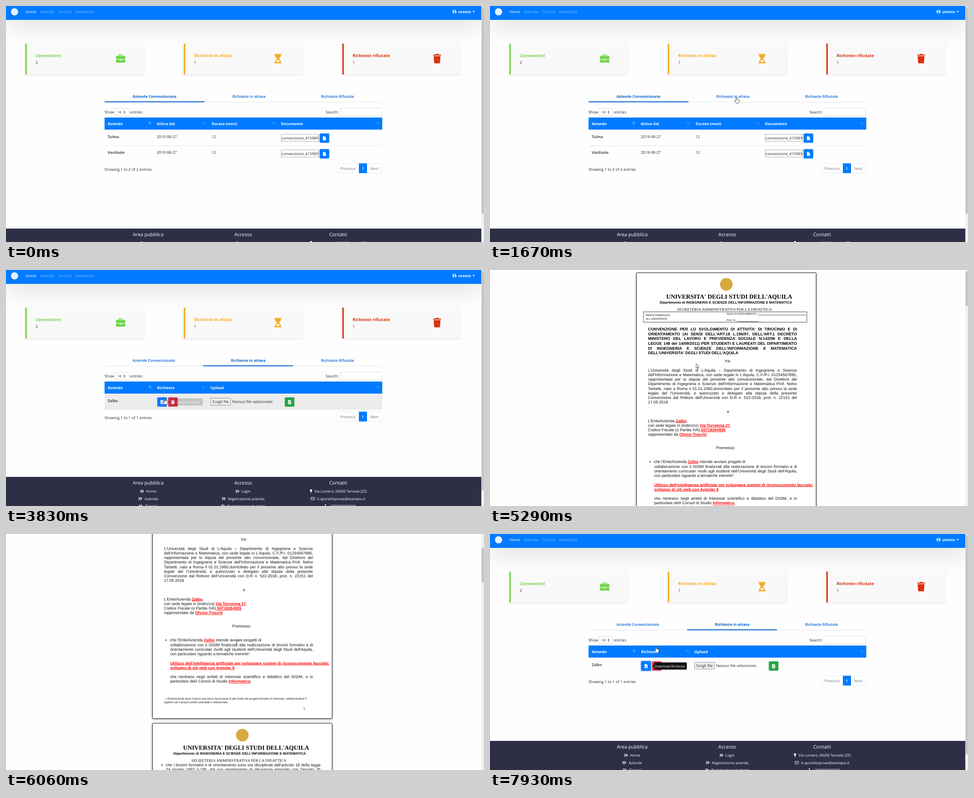
These frames come from a looping animation (1062 px wide and 527 px high, 8 s). An HTML page:

```html
<!DOCTYPE html>
<html lang="it">
<head>
<meta charset="utf-8">
<title>Convenzioni</title>
<style>
html, body { margin: 0; width: 100%; height: 100%; overflow: hidden; background: #fefefe; }
svg { display: block; width: 100vw; height: 100vh; }
text { font: 8.5px "Open Sans", "Noto Sans", sans-serif; fill: #212529; text-rendering: geometricPrecision; white-space: pre; }
.b { font-weight: 700; font-size: 8.4px; }
.s { font-weight: 600; font-size: 8.4px; }
.m { text-anchor: middle; }
.w { fill: #fff; }
.dim { fill: #fff; fill-opacity: .5; }
.link { fill: #0062cc; }
.title { font-weight: 700; font-size: 9.2px; }
.head { font-weight: 500; font-size: 10.7px; fill: #fff; }
.foot { font-size: 8px; fill: #fff; }
.tip { font-size: 7.3px; fill: #fff; }
.gray { fill: #6c757d; }
.doc text { font: 8.87px "Liberation Sans", Arial, sans-serif; fill: #111; }
.doc .bold { font-weight: 700; fill: #000; }
.doc .uni { font: 700 13.65px "Liberation Serif", serif; fill: #000; }
.doc .dept { font-weight: 700; font-size: 7.73px; fill: #000; }
.doc .office { font: 8.8px "Liberation Serif", serif; }
.doc .small { font-size: 6px; }
.doc .note { font-size: 6.1px; }
.red { font-weight: 700; fill: #f00; text-decoration: underline; }
.nav { filter: drop-shadow(0 9px 27px rgba(0,0,0,.175)); }
.card { filter: drop-shadow(0 1px 2px rgba(0,0,0,.12)); }
.page { filter: drop-shadow(0 1px 2px rgba(0,0,0,.55)); }

.home { animation: home 8s step-end infinite; }
.doc { animation: doc 8s step-end infinite; }
.tabA { animation: tabA 8s step-end infinite; }
.tabB { animation: tabB 8s step-end infinite; }
.paneA { animation: paneA 8s linear infinite; }
.paneB { animation: paneB 8s linear infinite; }
.longer { animation: before 8s step-end infinite; }
.shorter { animation: after 8s step-end infinite; }
.footer { animation: footer 8s step-end infinite; }
.row1 { animation: row1 8s step-end infinite; }
.row2 { animation: row2 8s step-end infinite; }
.row3 { animation: row3 8s step-end infinite; }
.tooltip { animation: tooltip 8s linear infinite; }
.focus { animation: focus 8s step-end infinite; }
.status { animation: status 8s step-end infinite; }
.scroll { animation: scroll 8s linear infinite; }
.thumb { animation: thumb 8s linear infinite; }
.cursor { animation: move 8s linear infinite; }
.arrow { animation: arrow 8s step-end infinite; }
.hand { animation: hand 8s step-end infinite; }
.beam { animation: beam 8s step-end infinite; }

@keyframes home { 0% { opacity: 1 } 55.6% { opacity: 0 } 89.4%, 100% { opacity: 1 } }
@keyframes doc { 0% { opacity: 0 } 57.5% { opacity: 1 } 89.4%, 100% { opacity: 0 } }
@keyframes tabA { 0% { opacity: 1 } 29.6%, 100% { opacity: 0 } }
@keyframes tabB { 0% { opacity: 0 } 29.6%, 100% { opacity: 1 } }
@keyframes paneA { 0%, 29.6% { opacity: 1 } 31.6%, 100% { opacity: 0 } }
@keyframes paneB { 0%, 31.6% { opacity: 0 } 33.5%, 100% { opacity: 1 } }
@keyframes before { 0% { opacity: 1 } 31.6%, 100% { opacity: 0 } }
@keyframes after { 0% { opacity: 0 } 31.6%, 100% { opacity: 1 } }
@keyframes footer { 0% { transform: none } 31.6%, 100% { transform: translateY(-35px) } }
@keyframes row1 { 0% { opacity: 0 } 12.3% { opacity: 1 } 14.5%, 100% { opacity: 0 } }
@keyframes row2 { 0% { opacity: 0 } 10.5% { opacity: 1 } 12.3%, 100% { opacity: 0 } }
@keyframes row3 { 0% { opacity: 0 } 45.8% { opacity: 1 } 60%, 100% { opacity: 0 } }
@keyframes tooltip { 0%, 47.2% { opacity: 0 } 47.9% { opacity: .18 } 49.9%, 100% { opacity: 1 } }
@keyframes focus { 0% { opacity: 0 } 55%, 100% { opacity: 1 } }
@keyframes status {
  0% { opacity: 0 } 24.75% { opacity: .5 } 25.6% { opacity: 1 } 41.2% { opacity: 0 }
  51.75% { opacity: .5 } 52.7% { opacity: 1 } 55.6%, 100% { opacity: 0 }
}
@keyframes scroll {
  0%, 68% { transform: none } 72.87% { transform: translateY(-106.6px) }
  80.6%, 100% { transform: translateY(-333px) }
}
@keyframes thumb {
  0%, 68% { transform: none } 72.87% { transform: translateY(15.5px) }
  80.6%, 100% { transform: translateY(48px) }
}
@keyframes move {
  0%, 1.6% { transform: translate(1000px, 560px) }
  1.62% { transform: translate(982px, 518px) }
  6.25% { transform: translate(845px, 440px) }
  11.25% { transform: translate(650px, 332px) }
  15% { transform: translate(585px, 268px) }
  18.1% { transform: translate(552px, 222px) }
  20.8% { transform: translate(547.5px, 204px) }
  22.6% { transform: translate(547.5px, 204px) }
  22.9%, 27.6% { transform: translate(548px, 201px) }
  27.75%, 35.2% { transform: translate(545px, 195px) }
  35.4%, 39.2% { transform: translate(547px, 201px) }
  43.1% { transform: translate(470px, 250px) }
  47.8% { transform: translate(353px, 287px) }
  49.9%, 61.3% { transform: translate(347px, 290px) }
  66%, 67% { transform: translate(458px, 209.5px) }
  71.5%, 78.1% { transform: translate(512.5px, 236.5px) }
  81.5% { transform: translate(380px, 107px) }
  84.4% { transform: translate(228px, 8px) }
  85.4%, 93.3% { transform: translate(215px, -30px) }
  93.4% { transform: translate(228px, 16px) }
  96% { transform: translate(290px, 130px) }
  99%, 100% { transform: translate(369px, 252px) }
}
@keyframes arrow {
  0% { opacity: 1 } 14.5% { opacity: 0 } 16% { opacity: 1 } 18.6% { opacity: 0 }
  40.4% { opacity: 1 } 43.1% { opacity: 0 } 45.8% { opacity: 1 } 47% { opacity: 0 }
  57.5% { opacity: 1 } 69.5% { opacity: 0 } 79.6% { opacity: 1 } 98.7%, 100% { opacity: 0 }
}
@keyframes hand {
  0% { opacity: 0 } 14.5% { opacity: 1 } 16% { opacity: 0 } 18.6% { opacity: 1 }
  40.4% { opacity: 0 } 43.1% { opacity: 1 } 45.8% { opacity: 0 } 47% { opacity: 1 }
  57.5% { opacity: 0 } 98.7%, 100% { opacity: 1 }
}
@keyframes beam { 0% { opacity: 0 } 69.5% { opacity: 1 } 79.6%, 100% { opacity: 0 } }
</style>
</head>
<body>
<svg id="stage" viewBox="0 0 1062 527"></svg>
<script>
const text = (x, y, s, c = '', more = '') => `<text x="${x}" y="${y}" class="${c}" ${more}>${s}</text>`;
const rect = (x, y, w, h, fill, more = '') => `<rect x="${x}" y="${y}" width="${w}" height="${h}" fill="${fill}" ${more}/>`;
const path = (d, fill, more = '') => `<path d="${d}" fill="${fill}" ${more}/>`;
const group = (c, ...kids) => `<g class="${c}">${kids.join('')}</g>`;
const at = (x, y, s) => `<g transform="translate(${x} ${y})">${s}</g>`;
const box = (x, y, w, h, stroke, fill = '#fff', rx = 2) => rect(x, y, w, h, fill, `stroke="${stroke}" stroke-width=".8" rx="${rx}"`);
const red = s => `<tspan class="red">${s}</tspan>`;
const track = rect(1056, 0, 6, 527, '#f1f1f1');
const blue = '#007bff', line = '#dee2e6';

// Dashboard cards
const card = (x, color, name, n, icon) =>
  rect(x, 84, 262.5, 69, '#f9f9f9', 'class="card"') + rect(x, 84, 3.2, 69, color) +
  text(x + 23, 114.4, name, 'title', `style="fill:${color}"`) + text(x + 23, 129, n) + icon;

const briefcase = rect(244.3, 111.5, 20.8, 15, '#72d54a', 'rx="1.8"') +
  path('M250.6 112V110.2q0-1 1-1h6.2q1 0 1 1V112', 'none', 'stroke="#72d54a" stroke-width="1.8"') +
  rect(244, 118.8, 21.4, 1.1, '#f9f9f9') + rect(252.4, 118.8, 4.6, 2.4, '#f9f9f9');
const hourglass = path('M596.8 107.2h15v2.7h-15zM596.8 125.2h15v2.7h-15zM598.2 109h12.2q0 6-4.2 8.5 4.2 2.600 4.200 8.500h-12.200q0-6 4.200-8.500-4.200-2.500-4.200-8.500z', '#fca91b') +
  path('M600.600 125.200q.7-5 3.700-5.700 3 .7 3.700 5.700z', '#f9f9f9');
const trash = path('M949 108.400h5l1-1.300h5.600l1 1.300h4.800v2.400h-17.400zM950.200 112h15l-1 14.500q-.1 1.500-1.600 1.500h-9.800q-1.500 0-1.600-1.500z', '#d9320f');

// Tables
const sort = (x, up = .35) => at(x, 261.5,
  path('M0 3V-3M-1.300-1.600L0-3 1.300-1.600', 'none', `stroke="#fff" stroke-width=".8" opacity="${up}"`) +
  path('M3.700-3V3M2.400 1.600L3.700 3 5 1.600', 'none', 'stroke="#fff" stroke-width=".8" opacity=".35"'));
const header = (cols, sorts) => rect(219, 249, 617, 27, blue) +
  cols.map(([x, s]) => text(x, 266, s, 'b w')).join('') +
  sorts.map((x, i) => sort(x, i ? .35 : 1)).join('');
const sheet = path('M-3.200-4.500H1L3.400-2V4.500H-3.200z', '#fff');
const button = (x, y, color, icon) => rect(x, y, 21.500, 21, color, 'rx="2.200"') + at(x + 10.700, y + 10.700, icon);
const fileIcon = (color, d) => sheet + path(d, 'none', `stroke="${color}" stroke-width="1"`);
const down = 'M0-1.500V2.500M-1.500 1L0 2.500 1.500 1', upArrow = 'M0 3V-1M-1.500 .5L0-1 1.500 .5';

const company = (y, name) => text(226, y + 18, name, 's') + text(335, y + 18, '2019-08-27') + text(457, y + 18, '12') +
  box(611.400, y + 9.800, 83, 16, '#999', '#fff', 0) +
  text(612.300, y + 21, 'convenzione_415989', '', 'style="font-size:8.4px"') +
  button(696.700, y + 8, blue, sheet + path('M1-4.500V-2H3.400', 'none', `stroke="${blue}" stroke-width=".6"`));
const pager = (y, n) => text(219, y + 16, `Showing 1 to ${n} of ${n} entries`) +
  box(736.400, y, 99, 21, line) + rect(784, y - .4, 18, 21.800, blue) +
  text(760, y + 14, 'Previous', 'm gray') + text(793, y + 14, '1', 's m w') + text(818.500, y + 14, 'Next', 'm gray');

const paneA = group('paneA',
  header([[226, 'Azienda'], [335, 'Attiva dal'], [457, 'Durata (mesi)'], [611, 'Documento']], [318.500, 439.500, 593.500, 824.500]),
  group('row1', rect(219, 276, 617, 36, '#ececec')), group('row2', rect(219, 312, 617, 35, '#ececec')),
  company(276.500, 'Tulma'), rect(219, 311.800, 617, .8, line), company(311.500, 'Vardisole'), pager(351.800, 2));

const paneB = group('paneB',
  header([[226, 'Azienda'], [336, 'Richiesta'], [454, 'Upload']], [319.500, 436.500, 824.500]),
  group('row3', rect(219, 276, 617, 36, '#ececec')),
  text(226, 294.500, 'Zalbo', 's'),
  group('focus', rect(334.500, 282.500, 24.500, 24, blue, 'rx="3.500" opacity=".5"')),
  button(336, 284.300, blue, fileIcon(blue, down)),
  button(360, 284.300, '#dc3545', path('M-4-4h2.500l.5-.7h2l.5.700H4v1.200H-4zM-3.400-2.200H3.400L3 4.500H-3z', '#fff')),
  box(454.400, 286.200, 44.600, 15.600, '#767676', '#efefef', 1), text(458.300, 297, 'Scegli file'),
  text(502.500, 297, 'Nessun file selezionato', '', 'style="font-size:8.4px"'),
  button(619.300, 284.300, '#28a745', fileIcon('#28a745', upArrow)),
  group('tooltip', path('M360.300 295L364.600 291.500V298.500z', '#111'), rect(364.500, 286.800, 72.800, 16, '#111', 'rx="2"'),
    text(365.800, 297.500, 'Download Richiesta', 'tip')),
  pager(316.800, 1));

const tabs = rect(219, 214, 617, .8, line) +
  group('tabA', text(330, 205.300, 'Aziende Convenzionate', 'b m link'), text(539.800, 205.300, 'Richieste in attesa', 's m link'),
    rect(219, 213, 222, 2, '#0062cc')) +
  group('tabB', text(328.500, 205.300, 'Aziende Convenzionate', 's m link'), text(538.300, 205.300, 'Richieste in attesa', 'b m link'),
    rect(438, 213, 199.500, 2, '#0062cc')) +
  text(736.700, 205.300, 'Richieste Rifiutate', 's m link');

const controls = text(219, 239.600, 'Show') + box(243, 228.400, 29, 16.600, '#ced4da') + text(248, 240, '10', '', 'style="font-size:7.6px"') +
  path('M261.200 236.300l2-2.600 2 2.600zM261.200 237.700l2 2.600 2-2.600z', '#343a40') + text(275.500, 239.600, 'entries') +
  text(710, 239.800, 'Search:') + box(742.400, 228.400, 93, 16.600, '#ced4da');

// Footer
const chevrons = (x, y) => path(`M${x} ${y - 6}l3 3-3 3M${x + 4} ${y - 6}l3 3-3 3`, 'none', 'stroke="#fff" stroke-width="1.500"');
const item = (ix, x, y, s) => chevrons(ix, y) + text(x, y, s, 'foot');
const footer = group('footer', rect(0, 497, 1056, 80, '#2d3044'),
  text(316, 513.700, 'Area pubblica', 'head m'), text(527, 513.700, 'Accesso', 'head m'), text(738, 513.700, 'Contatti', 'head m'),
  item(298.500, 311, 532, 'Home'), item(294.500, 308, 548.500, 'Aziende'), item(295.500, 309.500, 565, 'Tirocini'),
  item(510.500, 523, 532, 'Login'), item(480, 493, 548.500, 'Registrazione azienda'), item(478.500, 491.500, 565, 'Registrazione studente'),
  '<circle cx="677.700" cy="527.200" r="2.500" fill="#fff"/>', rect(677.200, 529, 1.100, 4.500, '#fff'),
  text(685.500, 532, 'Via Lumero, 00000 Tarviola (ZZ)', 'foot'),
  box(677.600, 542.500, 8, 6, '#fff', 'none', .8), path('M677.600 543.500l4 3 4-3', 'none', 'stroke="#fff" stroke-width=".9"'),
  text(691, 548.500, 'it.sportelloprove@esempio.it', 'foot'),
  path('M708.500 558.500l1.500-.8 1 2-1 1q.8 2 2.400 2.600l1-1 1.500 1.200-1 1.600q-5 0-5.400-6.600z', '#fff'),
  text(717.500, 565, '+390000000000', 'foot'));

const nav = rect(0, 0, 1056, 31, blue, 'class="nav"') + '<circle cx="19" cy="13" r="8" fill="#e6f2ff"/>' +
  text(43, 16.200, 'Home', 'w') + text(76, 16.200, 'Aziende', 'dim') + text(116, 16.200, 'Tirocini', 'dim') + text(153.500, 16.200, 'Statistiche', 'dim') +
  '<circle cx="996.500" cy="13" r="4.300" fill="#fff"/><circle cx="996.500" cy="11.700" r="1.600" fill="#007bff"/>' +
  path('M993.600 15.500q.4-1.600 1.700-1.600h2.400q1.300 0 1.700 1.600-2.900 2.200-5.800 0z', blue) +
  text(1005, 16.300, 'utente', 'b w') + path('M1036.300 11.500h5.600l-2.800 3z', '#fff');

const home = group('home', nav,
  card(43, '#72d54a', 'Convenzioni', 2, briefcase),
  card(395, '#fca91b', 'Richieste in attesa', 1, hourglass),
  card(747.300, '#d9320f', 'Richieste rifiutate', 1, trash),
  tabs, controls, paneA, paneB, footer, track,
  group('longer', rect(1056.700, 2, 4.800, 462, '#c1c1c1')),
  group('shorter', rect(1056.700, 2, 4.800, 490, '#c1c1c1')));

// Agreement pages; every line but the last is justified to width w
const para = (x, w, y, step, rows, c = '') => rows.map((s, i) =>
  text(x, y + i * step, s, c, i < rows.length - 1 ? `data-w="${w}"` : '')).join('');
const bullet = (x, y) => `<circle cx="${x}" cy="${y - 3}" r="1.200" fill="#111"/>`;
const letterhead = (y, a, b, c) => `<circle cx="525" cy="${y + 26}" r="14" fill="#d9a93f"/>` +
  text(a, y + 58.400, "UNIVERSITA' DEGLI STUDI DELL'AQUILA", 'uni m') +
  text(b, y + 69.400, "Dipartimento di INGEGNERIA E SCIENZE DELL'INFORMAZIONE E MATEMATICA", 'dept m') +
  text(c, y + 85.200, 'SEGRETERIA AMMINISTRATIVA PER LA DIDATTICA', 'office m');
const page = y => rect(325.500, y, 399, 597, '#fff', 'class="page" stroke="#222" rx="1.500"');

const page1 = page(6.200) + letterhead(6, 531.500, 524, 521) +
  rect(341, 93.500, 363, 23, 'none', 'stroke="#333" stroke-width=".9"') +
  text(346, 103, 'PARTE RISERVATA', 'small') + text(346, 110.500, "ALL'UNIVERSITA'", 'small') +
  text(526, 100.200, 'DATA DI RICEVIMENTO:', 'small') + rect(596, 100.300, 106, .8, '#222') +
  text(526, 114.200, 'Prot. N.', 'small') + rect(548.500, 114.600, 47.500, .8, '#222') +
  para(351, 331, 135.300, 10.580, [
    "CONVENZIONE PER LO SVOLGIMENTO DI ATTIVITA' DI TIROCINIO E DI",
    "ORIENTAMENTO (AI SENSI DELL'ART.18 L.196/97, DELL'ART.1 DECRETO",
    'MINISTERO DEL LAVORO E PREVIDENZA SOCIALE N.142/98 E DELLA',
    'LEGGE 148 del 14/09/2011) PER STUDENTI E LAUREATI DEL DIPARTIMENTO',
    "DI INGEGNERIA E SCIENZE DELL'INFORMAZIONE E MATEMATICA",
    "DELL'UNIVERSITA' DEGLI STUDI DELL'AQUILA"], 'bold') +
  text(529, 206.300, 'tra:', 'm') +
  para(351, 331, 227, 10.150, [
    "L'Universitá degli Studi di L'Aquila – Dipartimento di Ingegneria e Scienze",
    "dell'Informazione e Matematica, con sede legale in L'Aquila, C.F./P.I. 01234567890,",
    'rappresentata per la stipula del presente atto convenzionale, dal Direttore del',
    "Dipartimento di Ingegneria e Scienze dell'Informazione e Matematica Prof. Nelvo",
    'Tarbetti, nato a Roma il 01.01.1960,domiciliato per il presente atto presso la sede',
    "legale del l'Universitá, e autorizzato e delegato alla stipula della presente",
    "Convenzione dal Rettore dell'Universitá con D.R n. 522-2018, prot. n. 22151 del",
    '17.05.2018']) +
  text(529, 318.500, 'e', 'm') +
  text(351, 339.500, `L'Ente/Azienda ${red('Zalbo')},`) +
  text(351, 349.700, `con sede legale in (indirizzo) ${red('Via Torvenna 27')},`) +
  text(351, 359.900, `Codice Fiscale (o Partita IVA)${red(' 50718264935')}`) +
  text(351, 370, `rappresentato da ${red('Olvino Traschi')}`) +
  text(523.700, 400.400, 'Premesso:', 'm') +
  bullet(355.500, 431.300) + text(364, 431, `che l'Ente/Azienda ${red('Zalbo')} intende avviare progetti di`) +
  para(364.700, 317.500, 441.800, 10.150, [
    'collaborazione con il DISIM finalizzati alla realizzazione di tirocini formativi e di',
    "orientamento curriculari rivolti agli studenti dell'Universitá degli Studi dell'Aquila,",
    'con particolare riguardo a tematiche inerenti¹:']) +
  text(364.700, 482.500, red("Utilizzo dell'intelligenza artificiale per sviluppare sistemi di riconoscimento facciale;")) +
  text(364.700, 492.700, red('sviluppo di siti web con Angular 6')) +
  para(364.700, 317.500, 513.300, 10.150, [
    'che rientrano negli ambiti di interesse scientifico e didattico del DISIM, e in',
    `particolare del/i Corso/i di Studio ${red('Informatica')};`]) +
  text(351, 561, '1', '', 'style="font-size:3.5px"') +
  text(355.500, 560.700, "L'Ente/Azienda deve inserire una breve descrizione di alto livello dei progetti formativi di interesse, enfatizzandone il", 'note') +
  text(351, 568.700, 'legame con il proprio profilo aziendale o istituzionale', 'note') +
  text(662.500, 584.400, '1', 'office m');

const page2 = page(614) + letterhead(614.500, 533.500, 519, 517.500) +
  bullet(346.500, 710.300) +
  para(355, 344, 710, 10.150, [
    "che i tirocini formativi e di orientamento sono ora disciplinati dall'articolo 18 della legge",
    '24 giugno 1997 n.196, dal suo regolamento di attuazione emanato con Decreto 25',
    'marzo 1998, n.142 e dalla legge 148 del 14/09/2011;']) +
  bullet(343.500, 751.300) +
  para(351.500, 347.500, 751, 10.150, [
    "che il Dipartimento di Ingegneria e Scienze dell'Informazione e Matematica intende",
    "attuare progetti diretti al raggiungimento delle finalitá indicate dall'art.18 L. 24 giugno",
    "1997 n.196 e dall'art.1 del suddetto decreto 25 marzo 1998 n. 142, che promuovono",
    'tirocini formativi e di orientamento presso le aziende;']) +
  bullet(343.500, 803.500) +
  para(351.500, 347.500, 803.300, 10.150, [
    'che al fine di agevolare le scelte professionali mediante la conoscenza diretta del',
    "mondo del lavoro e realizzare momenti di alternanza tra studio e lavoro nell'ambito dei",
    "processi formativi i soggetti richiamati dall'art.18, comma 1, lett. a) della legge 24 giugno",
    '1997 n.196, tra cui le Universitá, possono promuovere tirocini formativi e di',
    'orientamento presso datori di lavori pubblici e privati a beneficio di coloro che abbiano',
    "giá assolto l'obbligo scolastico ai sensi della legge 31.12.62 n.1859;"]);

const doc = group('doc', group('scroll', page1, page2), track,
  group('thumb', rect(1056.700, 3, 4.800, 77, '#c1c1c1')));

const ink = 'stroke="#222" stroke-width=".8" stroke-linejoin="round"';
const cursor = group('cursor',
  group('arrow', path('M0 0V9.500L2.200 7.500 3.700 10.800 5.100 10.200 3.700 7H6.700z', '#fff', ink)),
  group('hand', path('M-1.100 1q0-1 1-1t1 1V4.500q3.500.2 5.300 1.500V9.500L4.800 13H-.5L-4 8.700q-.2-1.400 1.200-1.100L-1.100 9z', '#fff', ink)),
  group('beam', path('M-1.800.5H1.800M0 .5V8.500M-1.800 8.500H1.800', 'none', 'stroke="#555" stroke-width=".9"')));

const stage = document.getElementById('stage');
stage.innerHTML = rect(0, 0, 1062, 527, '#fefefe') + doc + home +
  group('status', rect(0, 521, 150, 8, '#dee1e6', 'stroke="#b8bcc2" stroke-width=".6"')) + cursor;

for (const el of stage.querySelectorAll('[data-w]')) {
  const gaps = el.textContent.split(' ').length - 1;
  el.style.wordSpacing = (el.dataset.w - el.getComputedTextLength()) / gaps + 'px';
}
</script>
</body>
</html>
```
